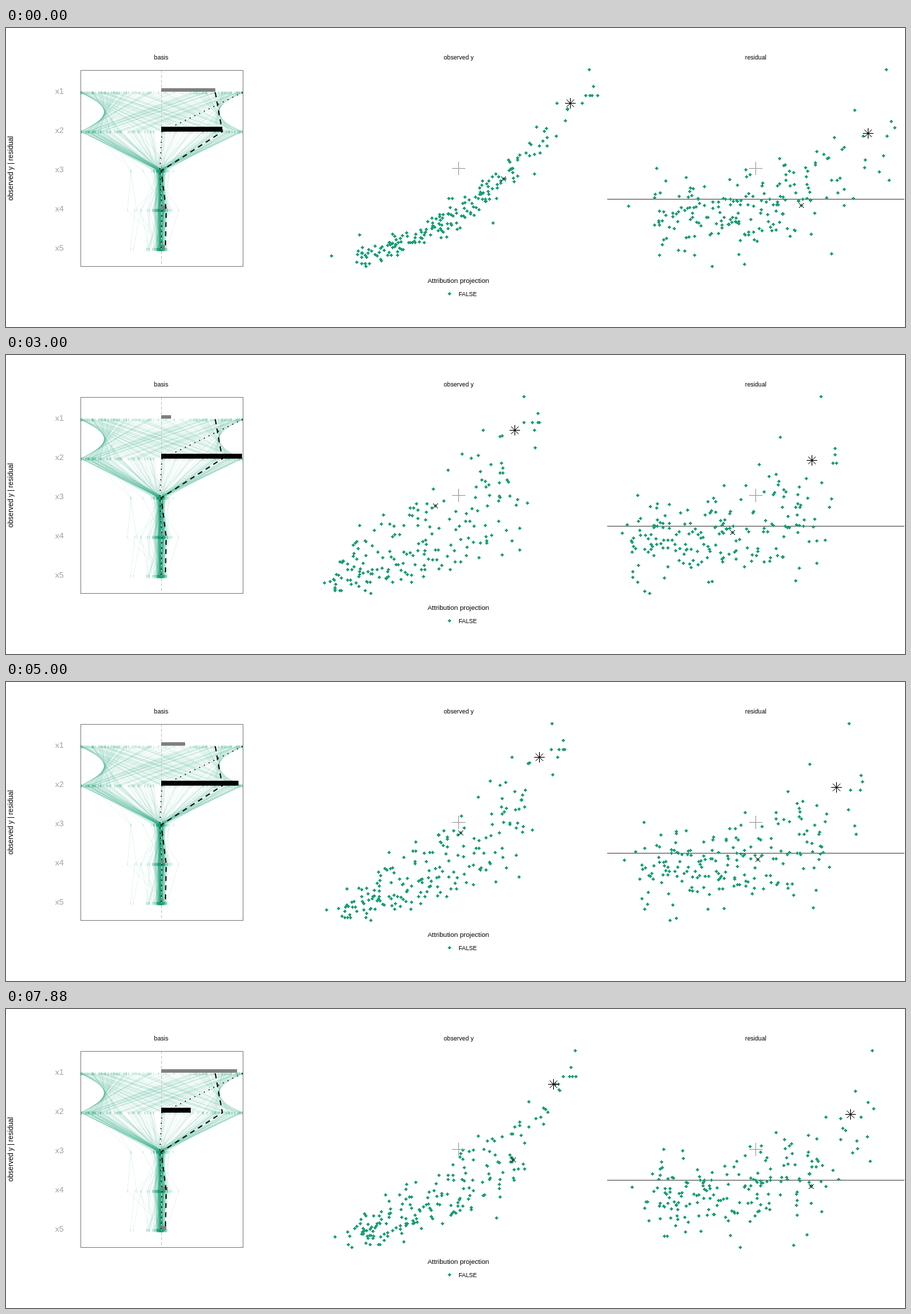
These frames come from a looping animation (1280 by 427 pixels, 8000 ms). An HTML page:

```html
<!DOCTYPE html>
<html lang="en">
<head>
<meta charset="utf-8">
<title>Radial tour</title>
<style>
  html, body { margin: 0; width: 100%; height: 100%; overflow: hidden; background: #fff; }
  svg { display: block; width: 1280px; height: 427px; }
  text { font-family: "Liberation Sans", Arial, sans-serif; text-anchor: middle; }
  .strip { font-size: 8.7px; }
  .title { font-size: 9.65px; }
  .axis { font-size: 10px; }
  .var { font-size: 11.6px; fill: #a0a0a0; }
  .key { font-size: 8.3px; text-anchor: start; }
  .crisp { shape-rendering: crispEdges; }
  .dot { fill: #1b9e77; }
  .mark { fill: none; stroke: #111; }
  .cross { fill: none; stroke: #a0a0a0; }
  .thread { fill: none; stroke: #1b9e77; stroke-width: 0.8; opacity: 0.12; }
  .tick { fill: none; stroke: #1b9e77; stroke-width: 1.4; opacity: 0.13; }
  .shown { fill: none; stroke: #000; }
</style>
</head>
<body>
<svg viewBox="0 0 1280 427">
  <g id="threads"></g>
  <path d="M221.5 60V340" stroke="#c4c4c4" stroke-dasharray="4 3"/>
  <g id="bars" class="crisp"></g>
  <path class="shown" d="M298 92L308 148L221 204L228 260L227 316" stroke-width="1.7" stroke-dasharray="7 6"/>
  <path class="shown" d="M337 92L222 148L219 204L222 260L221 316" stroke-width="1.4" stroke-dasharray="1.5 6"/>
  <rect x="106.5" y="60.5" width="231" height="280" fill="none" stroke="#8c8c8c"/>
  <path d="M856 244.5H1279" stroke="#555"/>
  <g id="dots" class="crisp"></g>
  <path class="cross" d="M635 200.5h19M644.5 191v19M1058 200.5h19M1067.5 191v19"/>
  <g id="marks"></g>
  <text class="strip" x="221" y="45">basis</text>
  <text class="strip" x="644.5" y="45">observed y</text>
  <text class="strip" x="1067.5" y="45">residual</text>
  <text class="axis" transform="translate(10 200.5) rotate(-90)">observed y | residual</text>
  <text class="title" x="644" y="363.5">Attribution projection</text>
  <circle class="dot crisp" cx="631.5" cy="379.5" r="2.05"/>
  <text class="key" x="644.5" y="383">FALSE</text>
  <g id="labels"></g>
</svg>
<script>
const NS = 'http://www.w3.org/2000/svg';
const ORIGIN = 451, SPAN = 282, SHIFT = 423.4, AXIS = 221.5, UNIT = 115.5;
const COUNT = 200, LOOP = 8000, BEAT = 500;
const rows = [0, 1, 2, 3, 4].map(i => 92 + 56 * i);

// Key observations: x2 pixels, x1 pixels, observed y, residual.
const star = [243, 257, 107, 150], peer = [131, 240, 215, 253];
const outliers = [
  [252, 287, 59, 59], [274, 272, 83, 133], [194, 284, 107, 117], [279, 206, 132, 154],
  [66, 18, 340, 302], [20, 175, 306, 340], [2, 264, 298, 337], [227, 197, 208, 322],
  [275, 54, 278, 297], [0, 18, 325, 254]
];

let seed = 20;
function rand() {
  seed = (seed + 0x6D2B79F5) | 0;
  let t = Math.imul(seed ^ (seed >>> 15), 1 | seed);
  t = (t + Math.imul(t ^ (t >>> 7), 61 | t)) ^ t;
  return ((t ^ (t >>> 14)) >>> 0) / 4294967296;
}
const gauss = () => (rand() + rand() + rand() + rand() - 2) * 1.73;
const clamp = (v, lo, hi) => Math.max(lo, Math.min(hi, v));

// Quadratic response with noise; the residual follows the same noise.
function observe() {
  let a, b;
  do {
    a = rand() ** 1.25;
    b = rand() ** 1.25;
  } while (a + b < 0.25);
  const s = a + b, n = gauss();
  const y = 332 - 6 * s - 66 * s * s + n * 8 + gauss() * 5;
  const r = 275 - 15 * s - 85 * Math.max(0, s - 1) + n * 28;
  return [a * SPAN, b * SPAN, clamp(y, 96, 336), clamp(r, 142, 324)];
}

function add(parent, name, attrs) {
  const el = document.createElementNS(NS, name);
  for (const k in attrs) el.setAttribute(k, attrs[k]);
  return document.getElementById(parent).appendChild(el);
}

// Unit-length attribution of one observation, drawn across the five rows.
function thread([a, b]) {
  const v = [b / SPAN - 0.5, a / SPAN - 0.5, gauss() * 0.011 - 0.005, gauss() * 0.016 - 0.004, gauss() * 0.012 - 0.006];
  const len = Math.hypot(...v);
  const xs = v.map(c => (AXIS + UNIT * c / len).toFixed(1));
  add('threads', 'path', { class: 'thread', d: 'M' + xs.map((x, i) => x + ' ' + rows[i]).join('L') });
  add('threads', 'path', { class: 'tick', d: xs.map((x, i) => `M${x} ${rows[i] - 1.5}v4`).join('') });
}

const data = [...outliers, star, peer];
while (data.length < COUNT) data.push(observe());
data.forEach(thread);

// Each observation has one shape in either panel, sharing x.
const movers = [];
const track = (p, make) => movers.push({ p, pair: [p[2], p[3]].map(y => ({ el: make(), y: Math.round(y) + 0.5 })) });
for (const p of data) track(p, () => add('dots', 'circle', { class: 'dot', r: 2.05 }));
track(star, () => add('marks', 'path', { class: 'mark', d: 'M-7.5 0h15M0-7.5v15M-5.3-5.3l10.6 10.6M-5.3 5.3l10.6-10.6' }));
track(peer, () => add('marks', 'path', { class: 'mark', d: 'M-3.5-3.5l7 7M-3.5 3.5l7-7' }));

rows.forEach((y, i) => {
  add('labels', 'text', { class: 'var', x: 76, y: y + 2 }).textContent = 'x' + (i + 1);
});

const bars = rows.map((y, i) => add('bars', 'rect', {
  x: 221, y: i === 1 ? y - 7 : y - 6, height: i === 1 ? 7 : 5, fill: i === 1 ? '#000' : '#808080'
}));

function pose(t) {
  const c = Math.cos(t), s = Math.sin(t);
  [s, c, 0.012 * s, 0.085 * s, 0.066 * s].forEach((w, i) => {
    bars[i].setAttribute('width', (w * UNIT).toFixed(1));
  });
  for (const { p, pair } of movers) {
    const x = ORIGIN + p[0] * c + p[1] * s;
    pair.forEach(({ el, y }, k) => {
      el.setAttribute('transform', `translate(${Math.round(x + k * SHIFT) + 0.5} ${y})`);
    });
  }
}

// Long hold, five steps down to zero, a pause, then steps up.
function stepAt(t) {
  if (t >= 7880) return 13;
  const beat = Math.floor(t / BEAT);
  return t >= 4500 ? beat - 3 : clamp(beat - 2, 0, 5);
}
const angle = i => i < 5 ? 0.724 - 0.15 * i : 0.15 * (i - 5);

let current = -1;
const begin = performance.now();
function tick(now) {
  const i = stepAt(Math.max(0, now - begin) % LOOP);
  if (i !== current) pose(angle(current = i));
  requestAnimationFrame(tick);
}
tick(begin);
</script>
</body>
</html>
```
